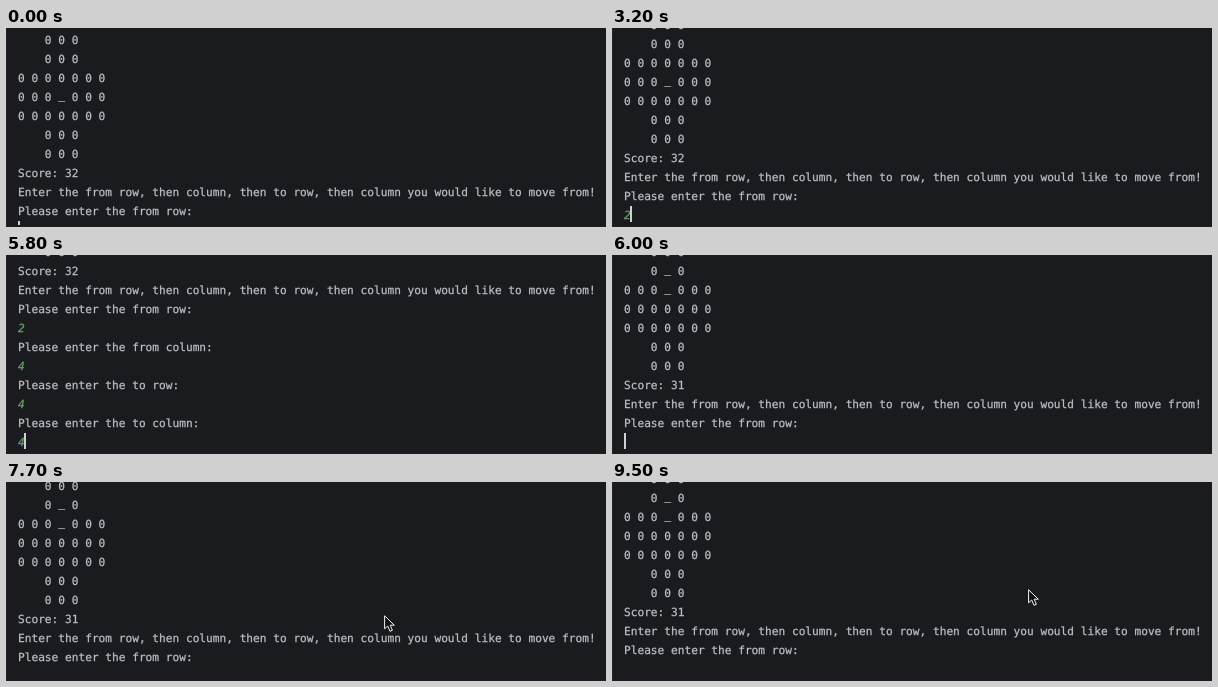
An HTML page that plays this animation: 600x199 px, repeating every 9900 ms.

```html
<!DOCTYPE html>
<html lang="en">
<head>
<meta charset="utf-8">
<title>Peg solitaire console</title>
<style>
  html, body { margin: 0; width: 100%; height: 100%; overflow: hidden; background: #1a1b1f; }
  #stage { position: absolute; left: 0; top: 0; width: 600px; height: 199px; overflow: hidden; background: #1a1b1f; }
  #stage::before { content: ""; position: absolute; left: 0; top: 0; width: 1px; height: 197px; background: #242529; }
  #stage::after { content: ""; position: absolute; left: 0; top: 198px; width: 600px; height: 1px; background: #261b21; }
  #console { position: absolute; left: 0; top: 0; width: 600px; height: 197px; overflow: hidden; }
  #log {
    position: absolute; left: 12px; top: 0; white-space: pre; color: #bcbec4;
    font: 11.17px/19px "DejaVu Sans Mono", monospace;
    text-rendering: geometricPrecision; -webkit-text-stroke: .25px;
  }
  #log div { height: 19px; }
  #log span { position: relative; top: -2px; }
  #log .input { color: #62a56b; font-style: italic; }
  #caret { position: absolute; width: 2px; height: 16px; background: #ced0d6; }
  #mouse { position: absolute; left: 0; top: 0; overflow: visible; }
</style>
</head>
<body>
<div id="stage">
  <div id="console">
    <div id="log"></div>
    <div id="caret"></div>
  </div>
  <svg id="mouse" width="11" height="17">
    <path d="M.6 .8V13.8L3.7 11L6 16.3L8.4 15.3L6.2 10.2H10.3Z" fill="#101114" stroke="#f4f4f4" stroke-linejoin="round"/>
  </svg>
</div>
<script>
const LOOP = 9900, STEP = 100, BLINK = 500, LINE = 19, LAST_LINE_Y = 178;
const [log, caret, mouse] = ["log", "caret", "mouse"].map(id => document.getElementById(id));

const wide = "0 0 0 0 0 0 0", gap = "0 0 0 _ 0 0 0", arm = "    0 0 0", armGap = "    0 _ 0";
const ask = what => `Please enter the ${what}:`;
const turn = (board, score) => [
  ...board,
  `Score: ${score}`,
  "Enter the from row, then column, then to row, then column you would like to move from!",
  ask("from row")
];

function addLine(text, className = "") {
  const row = document.createElement("div");
  row.className = className;
  row.innerHTML = text.replace("_", "<span>_</span>");
  return log.appendChild(row);
}

const answers = [
  { digit: 2, typed: 3000, entered: 3400, reply: [ask("from column")] },
  { digit: 4, typed: 4100, entered: 4300, reply: [ask("to row")] },
  { digit: 4, typed: 5000, entered: 5200, reply: [ask("to column")] },
  { digit: 4, typed: 5800, entered: 6000, reply: turn([arm, armGap, gap, wide, wide, arm, arm], 31) }
];

turn([arm, arm, wide, gap, wide, arm, arm], 32).forEach(text => addLine(text));
const firstLine = log.children.length;
for (const answer of answers) {
  answer.row = addLine(String(answer.digit), "input");
  answer.reply.forEach(text => addLine(text));
  answer.nextLine = log.children.length;
}
const keyTimes = answers.flatMap(({ typed, entered }) => [typed, entered]);

const ramp = (t, from, to) => Math.min(1, Math.max(0, (t - from) / (to - from)));
const ease = p => p * p * (3 - 2 * p);
const mix = (a, b, p) => a.map((v, i) => v + (b[i] - v) * p);
const show = (el, visible) => el.style.visibility = visible ? "visible" : "hidden";

// Distance in pixels that the console is scrolled back from its end.
const scrollBack = t => Math.round(
  15 * (1 - ramp(t, 700, 930)) + 20 * (ramp(t, 6910, 7200) - ramp(t, 7500, 7800)));

function pointer(t) {
  if (t < 3000) return mix([508, 127], [425, 106], ramp(t, 100, 200));
  const peak = mix([378, 133], [424, 93], ease(ramp(t, 8200, 8700)));
  return mix(peak, [416, 107], ease(ramp(t, 8900, 9300)));
}

function render(t) {
  const y = LAST_LINE_Y + scrollBack(t);
  const line = answers.findLast(a => t >= a.entered)?.nextLine ?? firstLine;
  log.style.top = y - line * LINE + "px";

  answers.forEach(({ row, typed }) => show(row, t >= typed));
  const afterDigit = answers.some(a => t >= a.typed && t < a.entered);
  caret.style.left = (afterDigit ? 18 : 12) + "px";
  caret.style.top = y + "px";
  const lastKey = keyTimes.findLast(time => time <= t) ?? -100;
  show(caret, Math.floor((t - lastKey) / BLINK) % 2 === 0);

  // Typing hides the pointer until it is moved again.
  show(mouse, t >= 100 && t < 3000 || t >= 6600);
  const [mx, my] = pointer(t).map(Math.round);
  mouse.style.transform = `translate(${mx}px, ${my}px)`;
}

const start = performance.now();
function tick() {
  const t = (performance.now() - start) % LOOP;
  render(Math.floor(t / STEP) * STEP);
  requestAnimationFrame(tick);
}
tick();
</script>
</body>
</html>
```
